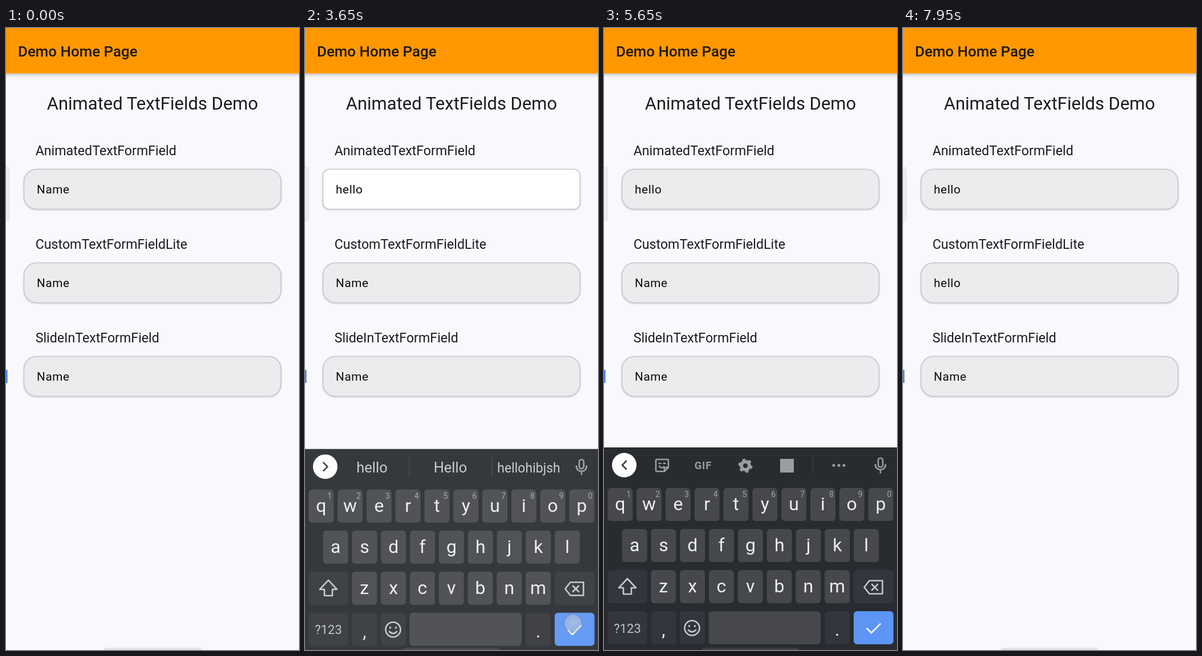
These frames come from a looping animation (514 px wide and 1090 px high, 8 s). An HTML page:

```html
<!DOCTYPE html>
<html lang="en">
<head>
<meta charset="utf-8">
<title>Text field demo</title>
<style>
  html, body { margin: 0; width: 100%; height: 100%; overflow: hidden; background: #faf8fc; }
  svg { display: block; width: 514px; height: 1090px; font-family: Roboto, sans-serif; }
  .field { stroke: #c6c4c8; stroke-width: 1.6; filter: url(#soft); }
  .input { font-size: 20.7px; letter-spacing: .65px; fill: #0b0b0d; white-space: pre; }
  .label { font-size: 23.2px; fill: #1d1b20; }
  .mid { text-anchor: middle; }
  .letter { font-size: 32px; fill: #eceef0; }
  .digit { font-size: 14px; fill: #a3a6aa; }
  .word { font-size: 25.5px; fill: #c8cacd; }
  .icon { fill: none; stroke: #c5c8cc; stroke-width: 2.6; stroke-linejoin: round; stroke-linecap: round; }
  .dim { stroke: #9a9da2; }
</style>
</head>
<body>
<svg id="stage" viewBox="0 0 514 1090">
  <defs>
    <filter id="soft" x="-5%" y="-20%" width="110%" height="140%">
      <feDropShadow dx="0" dy="1" stdDeviation="1.3" flood-color="#000" flood-opacity=".2"/>
    </filter>
    <filter id="drop" x="-5%" y="-20%" width="110%" height="150%">
      <feDropShadow dx="0" dy="2" stdDeviation="3" flood-color="#000" flood-opacity=".28"/>
    </filter>
    <radialGradient id="dot">
      <stop offset="0" stop-color="#d6d9de" stop-opacity=".88"/>
      <stop offset=".78" stop-color="#c3c7ce" stop-opacity=".84"/>
      <stop offset=".86" stop-color="#8d929a" stop-opacity=".5"/>
      <stop offset="1" stop-color="#50545c" stop-opacity="0"/>
    </radialGradient>
  </defs>

  <rect width="514" height="1090" fill="#faf8fc"/>
  <rect x="-10" y="-10" width="534" height="89.5" fill="#ff9800" filter="url(#drop)"/>
  <text x="21" y="49.5" font-size="25.9" font-weight="500" fill="#1d1710">Demo Home Page</text>
  <text x="257" y="143" font-size="31" class="mid" fill="#1d1b20">Animated TextFields Demo</text>
  <g id="form"></g>
  <rect x="-4" y="244.5" width="9.5" height="93" rx="2" fill="#efedf0" stroke="#dddbde"/>
  <g id="keyboard">
    <rect y="735" width="514" height="420" fill="#282b30"/>
    <circle cx="35.5" cy="766" r="21.5" fill="#fff"/>
    <path id="chevron" class="icon" style="stroke:#3a3d42"/>
    <g class="icon dim">
      <rect x="481" y="753.5" width="8" height="16" rx="4"/>
      <path d="M476 765c0 12 18 12 18 0M485 774.500v5"/>
    </g>
    <g id="tools">
      <g class="icon dim" stroke-width="2.2">
        <path d="M93 756h18q2 0 2 2v12l-7 7h-13q-2 0-2-2v-17q0-2 2-2zM106 776v-6h6M96.500 763h3M104.500 763h3M97 768q4 5 8 1"/>
        <circle cx="248" cy="767" r="7" stroke-width="6"/>
        <circle cx="248" cy="767" r="10.500" stroke-width="4" stroke-dasharray="5 6" stroke-linecap="butt"/>
      </g>
      <text x="174" y="772.500" class="mid" font-size="18.500" font-weight="700" letter-spacing=".8" fill="#9a9da2">GIF</text>
      <rect x="309" y="755" width="24" height="24" fill="#9a9da2"/>
      <path d="M366.500 750v32" stroke="#3c3f44" stroke-width="1.500"/>
      <g fill="#9a9da2"><circle cx="403" cy="766.500" r="2.500"/><circle cx="412" cy="766.500" r="2.500"/><circle cx="421" cy="766.500" r="2.500"/></g>
    </g>
    <g id="words">
      <path d="M183 750v33M328.500 750v33" stroke="#3f4247" stroke-width="1.500"/>
    </g>
    <g id="keys"></g>
    <g class="icon">
      <path d="M41 965l15 16h-8v11h-14v-11h-8z"/>
      <path d="M465.500 968.500h23v23h-23l-9-11.500zM470 975l10 10M480 975l-10 10"/>
      <circle cx="154.500" cy="1051.500" r="13"/>
      <path d="M149.500 1048v.1M159.500 1048v.1" stroke-width="3.600"/>
      <path d="M148 1055q6.500 6.500 13 0"/>
      <path d="M461.500 1052.500l7.500 7.500 15.500-15.500" style="stroke:#fff"/>
    </g>
    <g id="popup">
      <rect x="-27" y="-101" width="54" height="165" rx="6" fill="#2f3238"/>
      <text id="popLetter" y="-48" class="mid" font-size="38" fill="#eceef0"></text>
      <path id="popDots" d="M9.500-31.500h.1M14.500-31.500h.1M19.500-31.500h.1" class="icon"/>
    </g>
  </g>
  <rect x="172" y="1086" width="170" height="6" rx="2" fill="#8c8c8c" fill-opacity=".2"/>
  <g id="touches"></g>
</svg>

<script>
const LOOP = 8000;
const $ = id => document.getElementById(id);

function add(parent, tag, attrs, text) {
  const el = document.createElementNS('http://www.w3.org/2000/svg', tag);
  for (const k in attrs) el.setAttribute(k, attrs[k]);
  if (text) el.textContent = text;
  return parent.appendChild(el);
}
const set = (el, attrs) => { for (const k in attrs) el.setAttribute(k, attrs[k]); };
const ramp = (t, start, len) => Math.min(1, Math.max(0, (t - start) / len));
const smooth = u => u * u * (3 - 2 * u);
const easeOut = u => 1 - (1 - u) ** 2;

// Form
const fields = ['AnimatedTextFormField', 'CustomTextFormFieldLite', 'SlideInTextFormField'].map((name, i) => {
  const y = 247.5 + 164 * i, base = y + 42;
  const g = $('form');
  add(g, 'text', { x: 51.7, y: y - 25, class: 'label' }, name);
  return {
    box: add(g, 'rect', { x: 31.5, y, width: 451, height: 70, rx: 22, fill: '#edebee', class: 'field' }),
    hint: add(g, 'text', { x: 54, y: base, class: 'input' }, 'Name'),
    text: add(g, 'text', { x: 54, y: base, class: 'input' }),
    line: add(g, 'rect', { x: 55, y: base + 1.7, height: 1.5, fill: '#0b0b0d' }),
    caret: add(g, 'rect', { y: base - 18.5, width: 2.6, height: 23, fill: '#4a86ee' })
  };
});

// Keyboard
const PITCH = 50.8;
const keyPos = {};
function key(x, y, w, fill, label, cls = 'letter', dy = 39) {
  add($('keys'), 'rect', { x, y, width: w, height: 58, rx: 6, fill });
  if (label) add($('keys'), 'text', { x: x + w / 2, y: y + dy, class: cls + ' mid' }, label);
}
[['qwertyuiop', 6.3], ['asdfghjkl', 31.7], ['zxcvbnm', 82.3]].forEach(([row, x0], r) => {
  [...row].forEach((c, i) => {
    const x = x0 + PITCH * i, y = 806 + 72 * r;
    keyPos[c] = [x + 22, y];
    key(x, y, 44, '#46484d', c);
    if (!r) add($('keys'), 'text', { x: x + 37, y: y + 16, class: 'digit mid' }, String((i + 1) % 10));
  });
});
const DARK = '#33363c';
key(6.3, 950, 69.5, DARK);
key(438, 950, 69.8, DARK);
key(6.3, 1022, 69.5, DARK);
add($('keys'), 'text', { x: 41, y: 1059.5, class: 'mid', 'font-size': 22, fill: '#c0c3c7' }, '?123');
key(82.3, 1022, 44, DARK, ',', 'letter', 43);
key(133.1, 1022, 44, DARK);
key(183.500, 1022, 196.500, '#46484d');
key(387.1, 1022, 44, DARK, '.', 'letter', 43);
key(438, 1022, 69.8, '#5c95f6');
const words = [117.5, 255, 392.5].map(x => add($('words'), 'text', { x, y: 776, class: 'word mid' }));
const guesses = {
  h: ['h', 'how', 'he'],
  he: ['he', 'hey', 'her'],
  hel: ['hel', 'hello', 'helo'],
  hell: ['hell', 'hello', 'Hello'],
  hello: ['hello', 'Hello', 'hellohibjsh']
};

// Script of the two typing sessions; times in ms
const sessions = [
  { field: 0, tap: 60, tapY: 285, focus: 350, open: 420, downs: [2050, 2170, 2420, 2700, 2890], done: 3480, close: 3600 },
  { field: 1, tap: 4900, tapY: 449, focus: 4960, open: 5130, downs: [6300, 6520, 6740, 6970, 7170], done: 7490, close: 7620 }
];
const WORD = 'hello', HOLD = 95;
const spots = { h: [296, 911], e: [135.500, 821], l: [475, 920], o: [440, 835] };
const touches = [];
const touch = (t, [cx, cy]) => touches.push({
  t, el: add($('touches'), 'circle', { cx, cy, r: 18, fill: 'url(#dot)' })
});
for (const s of sessions) {
  touch(s.tap, [250, s.tapY]);
  s.downs.forEach((t, i) => touch(t, spots[WORD[i]]));
  touch(s.done, [470, 1043]);
}

function drawField(s, t) {
  const f = fields[s.field];
  const typed = s.downs.filter(d => t >= d + HOLD);
  const text = WORD.slice(0, typed.length);
  const last = typed.length ? typed[typed.length - 1] + HOLD : s.focus;
  const focused = t >= s.focus && t < s.done + HOLD;
  f.text.textContent = text;
  const w = text ? f.text.getComputedTextLength() : 0;
  f.hint.style.opacity = 1 - ramp(t, s.downs[0] + 170, 80);
  set(f.line, { width: focused ? Math.max(0, w - 1) : 0 });
  set(f.caret, {
    x: 54.800 + w,
    opacity: focused && Math.floor((t - last) / 500) % 2 === 0 ? 1 : 0
  });
  return text;
}

function drawKeyboard(s, t, text) {
  const shown = t < s.close ? easeOut(ramp(t, s.open, 250)) : 1 - ramp(t, s.close, 200) ** 2;
  set($('keyboard'), { opacity: shown, transform: `translate(0 ${(1 - shown) * 42})` });
  $('tools').style.display = text ? 'none' : '';
  $('words').style.display = text ? '' : 'none';
  set($('chevron'), { d: text ? 'M32.500 759l7 7-7 7' : 'M39 759l-7 7 7 7' });
  words.forEach((el, i) => {
    const word = text ? guesses[text][i] : '';
    el.textContent = word;
    el.style.fontSize = word.length > 9 ? '23px' : '';
  });
  const i = s.downs.findIndex(d => t >= d && t < d + HOLD);
  $('popup').style.display = i < 0 ? 'none' : '';
  if (i >= 0) {
    const c = WORD[i];
    set($('popup'), { transform: `translate(${keyPos[c]})` });
    $('popLetter').textContent = c;
    $('popDots').style.display = 'eo'.includes(c) ? '' : 'none';
  }
}

function render(t) {
  const texts = sessions.map(s => drawField(s, t));
  const now = t < 4500 ? 0 : 1;
  drawKeyboard(sessions[now], t, texts[now]);

  // The first field turns white and squarer while it is focused
  const lit = smooth(ramp(t, 350, 300)) - smooth(ramp(t, 3800, 300));
  const mix = (a, b) => Math.round(a + (b - a) * lit);
  set(fields[0].box, { rx: 22 - 11 * lit, fill: `rgb(${mix(237, 255)},${mix(235, 255)},${mix(238, 255)})` });

  for (const p of touches)
    p.el.style.opacity = t < p.t ? 0 : 1 - ramp(t, p.t + HOLD, 200);
}

function tick() {
  render(performance.now() % LOOP);
  requestAnimationFrame(tick);
}
tick();
</script>
</body>
</html>
```
